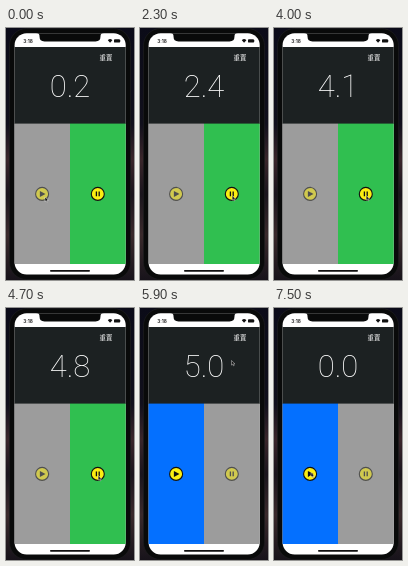
Animation, 128 px wide and 252 px high, one loop 7600 ms. Source, as an HTML page:

```html
<!DOCTYPE html>
<html lang="zh">
<head>
<meta charset="utf-8">
<title>Stopwatch</title>
<style>
  html, body { margin: 0; width: 100%; height: 100%; overflow: hidden; background: #0b0b14; }
  svg { display: block; width: 128px; height: 252px; }
  .count { font: 100 31px Roboto, Inter, sans-serif; fill: #fff; text-anchor: middle; }
  .reset { font: 400 6.4px "Noto Sans CJK SC", "Noto Sans CJK", sans-serif; fill: #fff; text-anchor: middle; }
  .clock { font: 600 4.8px Inter, sans-serif; fill: #111; text-anchor: middle; }
  .half { fill: #9c9c9c; }
  .btn { opacity: .55; }
  .btn circle { fill: #fbee12; stroke: #111; stroke-width: 1.1; }
  .running .right, .paused .left { opacity: 1; }
  .running .green { fill: #30bf50; }
  .paused .blue { fill: #0470ff; }
</style>
</head>
<body>
<svg id="app" class="running" viewBox="0 0 128 252">
  <defs>
    <linearGradient id="edge" x2="0" y2="1">
      <stop offset="0" stop-color="#0b0b18"/>
      <stop offset=".38" stop-color="#11101c"/>
      <stop offset=".52" stop-color="#3a262b"/>
      <stop offset=".66" stop-color="#1a151d"/>
      <stop offset=".82" stop-color="#3a2a2c"/>
      <stop offset="1" stop-color="#17131a"/>
    </linearGradient>
    <clipPath id="screen"><rect x="8.6" y="5.2" width="111.1" height="241.4" rx="12"/></clipPath>
  </defs>

  <rect width="128" height="252" fill="url(#edge)"/>
  <rect x="3.5" y=".5" width="121" height="251" rx="17" fill="#090a0a" stroke="#1d1e1f" stroke-width=".7"/>

  <g clip-path="url(#screen)">
    <rect width="128" height="252" fill="#fff"/>
    <rect y="19" width="128" height="77" fill="#1c2122"/>
    <rect class="half blue" y="95.6" width="64" height="140.4"/>
    <rect class="half green" x="64" y="95.6" width="64" height="140.4"/>
    <path d="M30 5Q33.5 5 33.5 8V8.5Q33.5 13.4 38.5 13.4H89.5Q94.5 13.4 94.5 8.5V8Q94.5 5 98 5Z" fill="#090a0a"/>
  </g>
  <rect x="44" y="242" width="40" height="1.7" rx=".85" fill="#111"/>

  <text class="clock" x="22" y="14.7">3:18</text>
  <path d="M101.8 12.2Q104.1 10 106.4 12.2L104.1 14.8Z" fill="#111"/>
  <rect x="108" y="11.2" width="6" height="3.4" rx=".9" fill="#111"/>
  <rect x="114.3" y="12.2" width=".6" height="1.4" fill="#777"/>

  <text class="reset" x="100" y="32.4">重置</text>
  <text class="count" id="count" x="64" y="69">0.2</text>

  <g class="btn left" transform="translate(36.1 165.9)">
    <circle r="6.5"/>
    <path d="M-2.2-3L3.4 0L-2.2 3Z" fill="#111"/>
  </g>
  <g class="btn right" transform="translate(91.8 165.9)">
    <circle r="6.5"/>
    <path d="M-1.4-2.3V2.3M1.4-2.3V2.3" stroke="#111" stroke-width="1.3"/>
  </g>

  <path id="cursor" d="M0 0V4.6L1.1 3.6L1.9 5.3L2.7 4.9L2 3.3H3.4Z" fill="#111" stroke="#fff" stroke-width=".4"/>
</svg>
<script>
const LOOP = 7600, STEP = 100, PAUSE = 4900, RESET = 6500;
const app = document.getElementById('app');
const count = document.getElementById('count');
const cursor = document.getElementById('cursor');

// time, x, y of the pointer
const path = [
  [0, 39, 169], [400, 39, 169], [1200, 83, 171], [1300, 84.5, 170.5],
  [1900, 92.2, 167.6], [5100, 92.2, 167.6], [5900, 91.5, 52.5],
  [6300, 99, 29], [6600, 99, 29], [6700, 97, 31], [7400, 37, 164], [7600, 37, 165]
];

function pointAt(t) {
  const i = path.findIndex(p => p[0] > t);
  const [t0, x0, y0] = path[i - 1], [t1, x1, y1] = path[i];
  const u = (t - t0) / (t1 - t0), e = u * u * (3 - 2 * u);
  return [x0 + (x1 - x0) * e, y0 + (y1 - y0) * e];
}

function tenthsAt(t) {
  if (t >= RESET) return 0;
  return Math.min(t, PAUSE) / STEP + (t < 300 ? 2 : 1);
}

function draw(ms) {
  const t = Math.floor((ms % LOOP) / STEP) * STEP;
  count.textContent = (tenthsAt(t) / 10).toFixed(1);
  app.setAttribute('class', t < PAUSE ? 'running' : 'paused');
  cursor.setAttribute('transform', `translate(${pointAt(t)})`);
}

let start;
function tick(now) {
  start ??= now;
  draw(now - start);
  requestAnimationFrame(tick);
}
draw(0);
requestAnimationFrame(tick);
</script>
</body>
</html>
```
